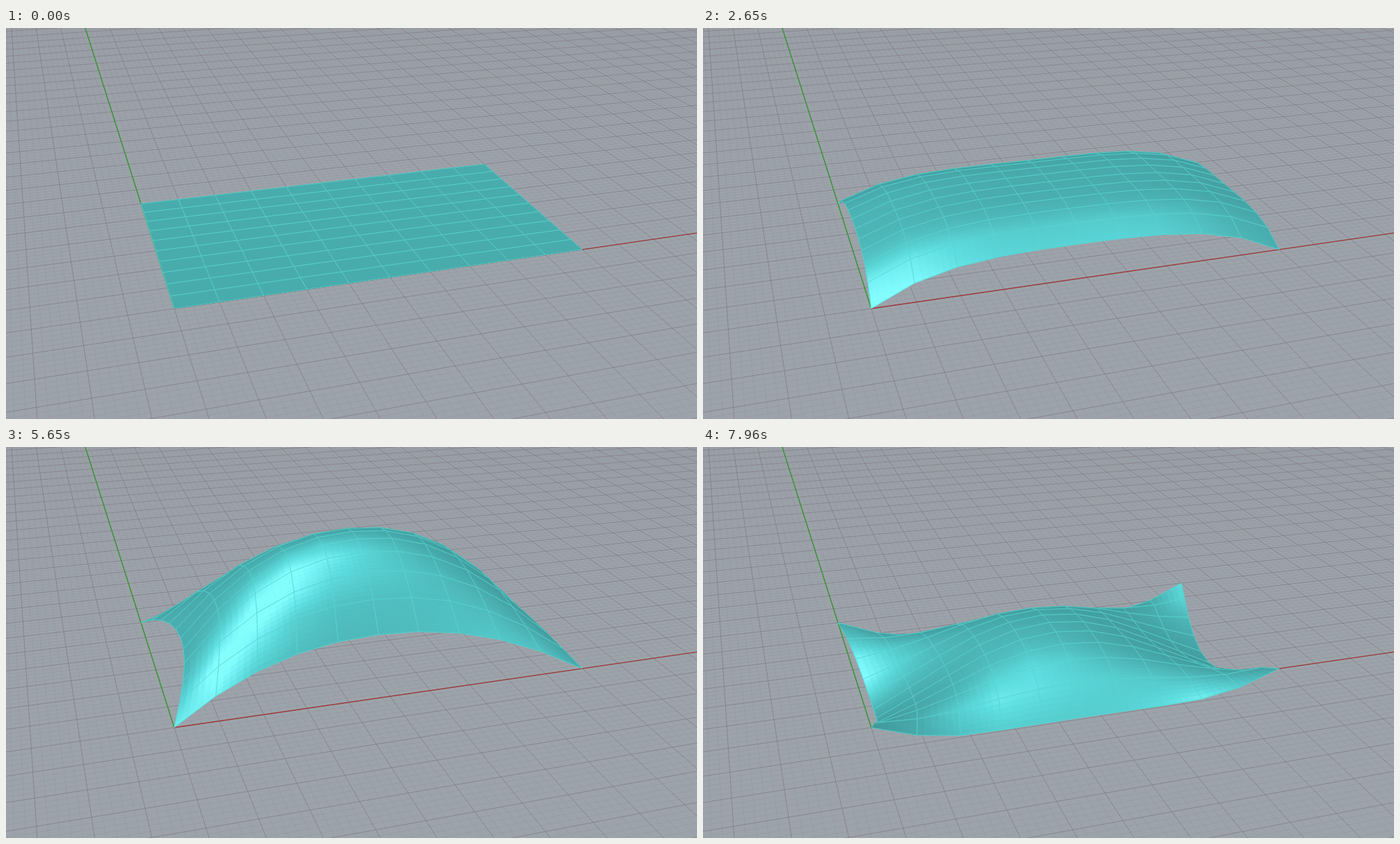
Write an HTML page with a canvas that moves like this. It is 994 by 563 pixels and loops after 8000 ms.

```html
<!DOCTYPE html>
<html lang="en">
<head>
<meta charset="utf-8">
<title>Mesh relaxation</title>
<style>
  html, body { margin: 0; width: 100%; height: 100%; overflow: hidden; background: #9da3aa; }
  canvas { display: block; width: 994px; height: 563px; }
</style>
</head>
<body>
<canvas id="view" width="994" height="563"></canvas>
<script>
const W = 994, H = 563, LOOP = 8000;
const CELLS = 10, SUB = 6;
const LIGHT = [-.35, -.55, .757];
const SETTLED = 20, PAUSE = 3;

// Key poses of the sheet, placed by solver step: lift of the long edges, the short
// edges and the middle, inward pull of the short edges, and how boxy the arcs are.
const POSES = [
  { step: 0, long: 0, short: 0, top: 0, pull: 0, boxy: 6, boxyLong: 6, ease: 1 },
  { step: 6, long: .5, short: .5, top: .5, pull: 0, boxy: 4.6, boxyLong: 4.6, ease: 2 },
  { step: 11, long: 1, short: .69, top: 2.28, pull: .05, boxy: 2.8, boxyLong: 2.6, ease: 1 },
  { step: 16, long: 1.27, short: .83, top: 3.4, pull: .158, boxy: 2, boxyLong: 2, ease: 1 },
  { step: SETTLED, long: 1.17, short: .76, top: 3.03, pull: .13, boxy: 2.2, boxyLong: 2.2, ease: 1 },
  { step: 22, long: .71, short: .34, top: 2.41, pull: .12, boxy: 2.5, boxyLong: 2, ease: 2 },
  { step: 24, long: -.64, short: -1.15, top: .62, pull: .085, boxy: 2, boxyLong: 6, ease: 1 }
];

const ctx = document.getElementById('view').getContext('2d');
const mix = (a, b, k) => a + (b - a) * k;
const clamp = (v, lo, hi) => Math.min(hi, Math.max(lo, v));

// Steps start at 1206 ms and take a little longer each time.
function stepAt(t) {
  const first = 1206, gap = 145.4, growth = 3.83;
  const root = gap * gap + 4 * growth * (t - first);
  return Math.max(0, Math.floor((Math.sqrt(Math.max(0, root)) - gap) / (2 * growth)));
}

function poseAt(step) {
  step -= clamp(step - SETTLED, 0, PAUSE);
  const i = Math.max(1, POSES.findIndex(p => p.step >= step));
  const a = POSES[i - 1], b = POSES[i];
  const k = Math.pow((step - a.step) / (b.step - a.step), b.ease);
  const pose = {};
  for (const key in a) pose[key] = mix(a[key], b[key], k);
  pose.sag = 1 + .6 * clamp((step - SETTLED) / 2, 0, 1);
  return pose;
}

// World units are major grid cells; z points up.
function project(x, y, z) {
  const w = 1 + .01241 * x + .03724 * y - .01777 * z;
  return [(242 + 68.99 * x - .743 * y - 8.83 * z) / w,
          (404 - 4.54 * x - 15.745 * y - 65.3 * z) / w];
}

const arc = (s, power, sag = 1) => Math.pow(Math.max(0, 1 - Math.pow(Math.abs(s), power)), sag);

// s, q run from -1 to 1 across the sheet; the four corners stay on the ground.
function surface(p, s, q) {
  const middle = p.top - p.long - p.short;
  return [
    5 + 5 * s * (1 - p.pull * (1 - q * q)),
    3 + 3 * q * (1 - .1 * p.top * (1 - s * s)),
    p.long * arc(s, p.boxyLong, p.sag) + p.short * arc(q, p.boxy, p.sag)
      + middle * arc(s, p.boxy) * arc(q, p.boxy)
  ];
}

// Brightness from the normal through the neighbouring nodes.
function shade(p, s, q) {
  const e = 2 / CELLS, lo = v => Math.max(-1, v - e), hi = v => Math.min(1, v + e);
  const diff = (a, b) => a.map((v, i) => v - b[i]);
  const u = diff(surface(p, hi(s), q), surface(p, lo(s), q));
  const v = diff(surface(p, s, hi(q)), surface(p, s, lo(q)));
  const n = [u[1] * v[2] - u[2] * v[1], u[2] * v[0] - u[0] * v[2], u[0] * v[1] - u[1] * v[0]];
  const d = Math.max(0, n.reduce((sum, c, i) => sum + c * LIGHT[i], 0) / Math.hypot(...n));
  return 132 + 50 * d + 95 * Math.pow(d, 14);
}

function tint(g) {
  g = Math.min(255, g);
  const r = .42 * g + Math.max(0, g - 220) * .68;
  return `rgb(${Math.round(r)},${Math.round(g)},${Math.round(Math.min(253, g * 1.01))})`;
}

function line(c, a, b) {
  c.beginPath();
  c.moveTo(...project(...a));
  c.lineTo(...project(...b));
  c.stroke();
}

function makeGround() {
  const cv = document.createElement('canvas');
  cv.width = W;
  cv.height = H;
  const c = cv.getContext('2d');
  c.fillStyle = '#9da3aa';
  c.fillRect(0, 0, W, H);
  const x0 = -5, x1 = 28, y0 = -8, y1 = 29;
  const grid = (major, style, width) => {
    c.strokeStyle = style;
    c.lineWidth = width;
    const each = (from, to, draw) => {
      for (let i = from * 5; i <= to * 5; i++) if ((i % 5 === 0) === major) draw(i / 5);
    };
    each(x0, x1, x => line(c, [x, y0, 0], [x, y1, 0]));
    each(y0, y1, y => line(c, [x0, y, 0], [x1, y, 0]));
  };
  grid(false, 'rgba(128,132,142,.25)', .8);
  grid(true, 'rgba(122,117,127,.64)', 1);
  c.lineWidth = 1.4;
  c.strokeStyle = 'rgb(156,58,58)';
  line(c, [0, 0, 0], [x1, 0, 0]);
  c.strokeStyle = 'rgb(50,152,48)';
  line(c, [0, 0, 0], [0, y1, 0]);
  return cv;
}

const ground = makeGround();

function polygon(pts) {
  ctx.beginPath();
  pts.forEach(([x, y], i) => i ? ctx.lineTo(x, y) : ctx.moveTo(x, y));
  ctx.closePath();
}

// A node is [x, y, brightness]; the cell blends its four nodes.
function drawCell(n00, n10, n11, n01) {
  const at = (u, v) => n00.map((c, k) => mix(mix(c, n10[k], u), mix(n01[k], n11[k], u), v));
  const d = 1 / SUB;
  ctx.lineWidth = .7;
  for (let j = SUB - 1; j >= 0; j--) {
    for (let i = SUB - 1; i >= 0; i--) {
      const u = i * d, v = j * d;
      ctx.fillStyle = ctx.strokeStyle = tint(at(u + d / 2, v + d / 2)[2]);
      polygon([at(u, v), at(u + d, v), at(u + d, v + d), at(u, v + d)]);
      ctx.fill();
      ctx.stroke();
    }
  }
  ctx.lineWidth = .8;
  ctx.strokeStyle = 'rgb(90,213,207)';
  polygon([n00, n10, n11, n01]);
  ctx.stroke();
}

function draw(step) {
  const p = poseAt(step), nodes = [];
  ctx.drawImage(ground, 0, 0);
  ctx.lineJoin = 'round';
  for (let j = 0; j <= CELLS; j++) {
    nodes.push([]);
    for (let i = 0; i <= CELLS; i++) {
      const s = 2 * i / CELLS - 1, q = 2 * j / CELLS - 1;
      nodes[j].push([...project(...surface(p, s, q)), shade(p, s, q)]);
    }
  }
  // Far cells first: the camera looks along +x, +y.
  for (let j = CELLS - 1; j >= 0; j--)
    for (let i = CELLS - 1; i >= 0; i--)
      drawCell(nodes[j][i], nodes[j][i + 1], nodes[j + 1][i + 1], nodes[j + 1][i]);
}

let shown = -1;
const start = performance.now();
function tick() {
  const step = stepAt(Math.max(0, performance.now() - start) % LOOP);
  if (step !== shown) {
    shown = step;
    draw(step);
  }
  requestAnimationFrame(tick);
}
tick();
</script>
</body>
</html>
```
